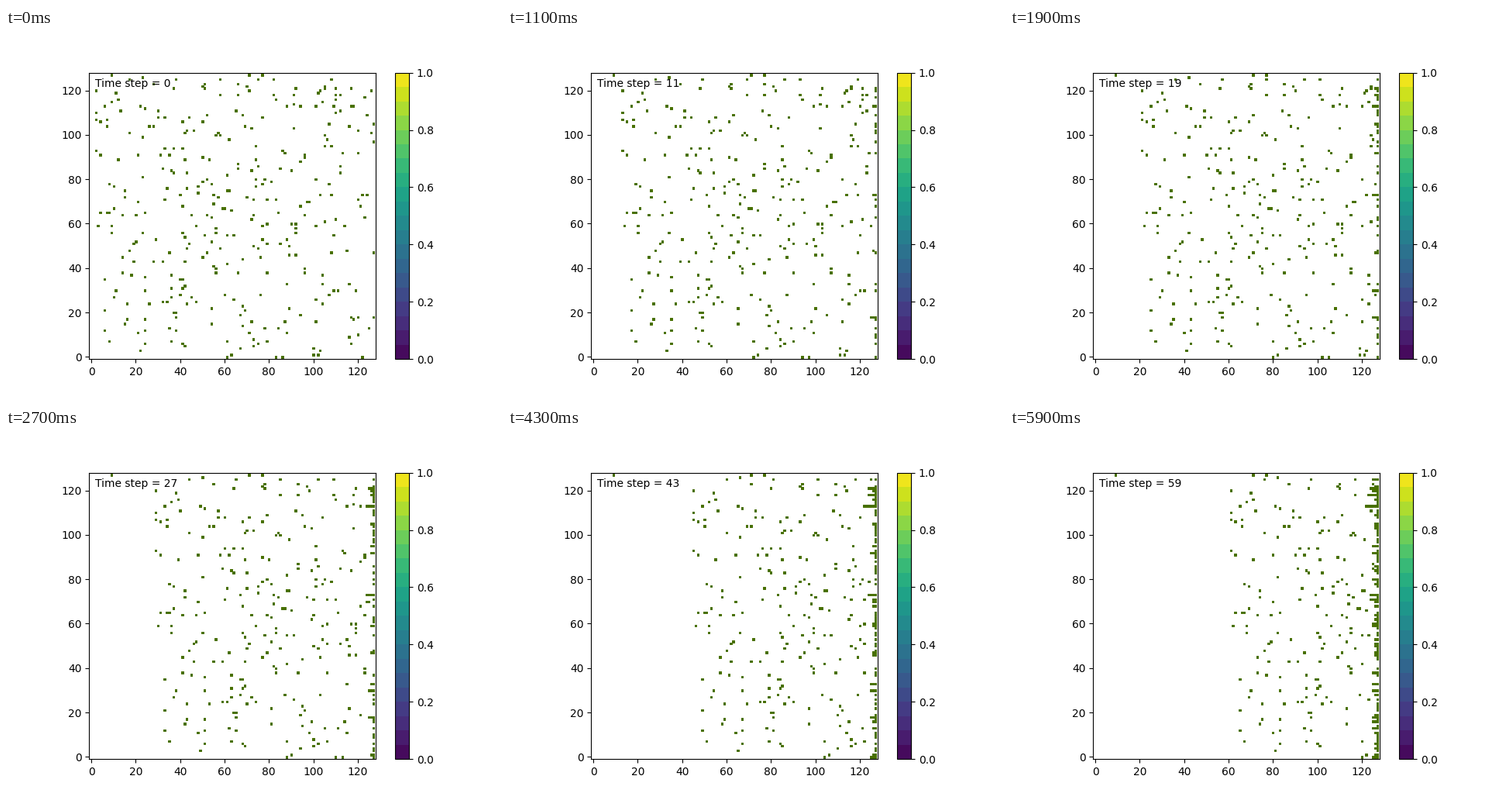
Write a matplotlib script that moves like this. It is 640x480 px and loops after 6000 ms.

```python
import numpy as np
import matplotlib.pyplot as plt
from matplotlib.animation import FuncAnimation
from matplotlib.colors import ListedColormap

SIZE = 128
STEPS = 60
MOVERS = 335
FIRST_COLUMN = 2
GREEN = "#487000"
BANDS = 20

plt.rcParams["font.family"] = "DejaVu Sans"


def random_cells(count):
    """Distinct cells below the top row, rightmost first."""
    rng = np.random.default_rng(7)
    width = SIZE - FIRST_COLUMN
    picks = rng.choice(width * (SIZE - 1), count, replace=False)
    rows, columns = np.divmod(picks, width)
    order = np.argsort(-columns)
    return columns[order] + FIRST_COLUMN, rows[order]


def wall_limits(rows):
    """Column where each particle comes to rest, queued up in its row."""
    queued = np.zeros(SIZE, dtype=int)
    limits = []
    for row in rows:
        limits.append(SIZE - 1 - queued[row])
        queued[row] += 1
    return np.array(limits)


start, rows = random_cells(MOVERS)
limits = wall_limits(rows)
top_row = [(x, SIZE - 1) for x in (9, 71, 77)]  # these never move


def positions(step):
    columns = np.minimum(start + step, limits)
    return np.vstack([np.column_stack([columns, rows]), top_row])


fig = plt.figure(figsize=(6.4, 4.8), dpi=100, facecolor="white")
ax = fig.add_axes([107.2 / 640, 0.11, 369.6 / 640, 0.77])
ax.set(xlim=(-1, SIZE), ylim=(-1, SIZE))

cells = positions(0)
# One colour per dot keeps each dot snapped to the pixel grid on its own.
dots = ax.scatter(cells[:, 0], cells[:, 1], s=3, marker="s",
                  linewidths=0.72, color=[GREEN] * len(cells))
label = ax.text(0.02, 0.95, "", transform=ax.transAxes)

bar_ax = fig.add_axes([501.6 / 640, 0.11, 18.48 / 640, 0.77])
band_centres = (np.arange(BANDS) + 0.5) / BANDS
banded = ListedColormap(plt.get_cmap("viridis")(band_centres))
fig.colorbar(plt.cm.ScalarMappable(plt.Normalize(0, 1), banded), cax=bar_ax)


def update(step):
    dots.set_offsets(positions(step))
    label.set_text(f"Time step = {step}")
    return dots, label


anim = FuncAnimation(fig, update, frames=STEPS, interval=100,
                     repeat=True, repeat_delay=0)
plt.show()
```
